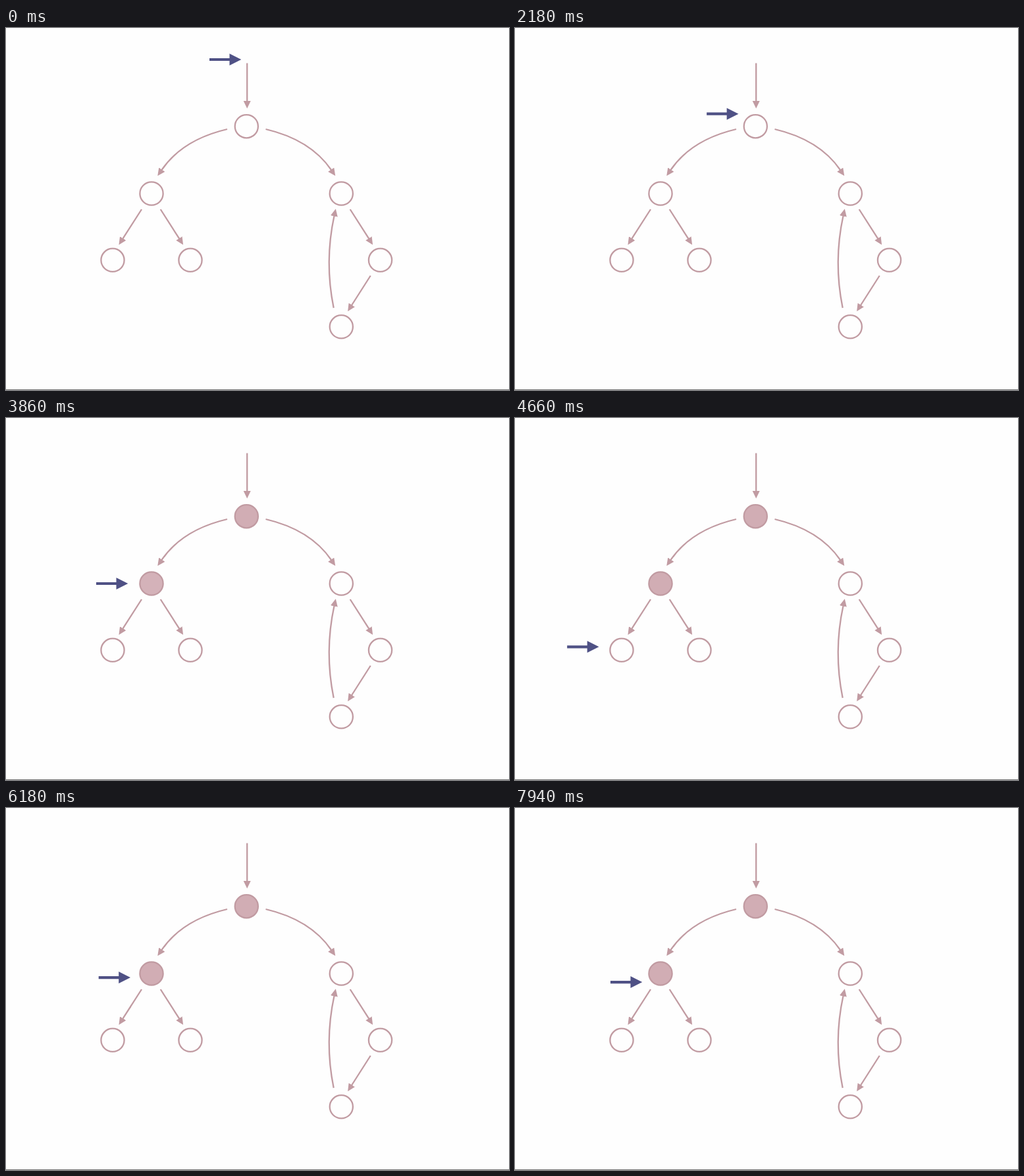
Animation of 764x551 px, one loop 8 s. Source, as an HTML page:

```html
<!DOCTYPE html>
<html lang="en">
<head>
<meta charset="utf-8">
<title>Tree traversal</title>
<style>
  html, body { margin: 0; width: 100%; height: 100%; overflow: hidden; background: #fefefe; }
  svg { display: block; width: 764px; height: 551px; }
  .edge { fill: none; stroke: #c19ba2; stroke-width: 2.3; marker-end: url(#head); }
  .node { fill: #d1adb4; fill-opacity: 0; stroke: #c19ba2; stroke-width: 2.3; }
</style>
</head>
<body>
<svg viewBox="0 0 764 551">
  <defs>
    <marker id="head" markerUnits="userSpaceOnUse" markerWidth="12" markerHeight="12"
            refX="0.5" refY="5.5" orient="auto">
      <path d="M0 0L11.5 5.5L0 11Z" fill="#c19ba2"/>
    </marker>
  </defs>
  <rect y="550" width="764" height="1" fill="#747474"/>
  <g class="edges">
    <path class="edge" d="M366.2 53.5V111.5"/>
    <path class="edge" d="M336 154Q268 170 236.5 216"/>
    <path class="edge" d="M394.5 154Q462.5 170 494 216"/>
    <path class="edge" d="M206 276L177.4 320.7"/>
    <path class="edge" d="M234.7 276L263.2 320.7"/>
    <path class="edge" d="M522.7 276L551.2 320.7"/>
    <path class="edge" d="M553.7 377L525 422"/>
    <path class="edge" d="M497.7 426Q483.4 356 498.5 286"/>
  </g>
  <circle class="node" id="root" cx="365.3" cy="149.7" r="17.6"/>
  <circle class="node" id="left" cx="221" cy="252" r="17.6"/>
  <circle class="node" cx="509.3" cy="252" r="17.6"/>
  <circle class="node" id="leafA" cx="162" cy="353.3" r="17.6"/>
  <circle class="node" id="leafB" cx="280" cy="353.3" r="17.6"/>
  <circle class="node" cx="568.5" cy="353.3" r="17.6"/>
  <circle class="node" cx="509.3" cy="454.8" r="17.6"/>
  <path id="pointer" d="M0 -2.1H30.5V-9L48.3 0L30.5 9V2.1H0Z" fill="#4f5185"/>
</svg>
<script>
  const LOOP = 8000, STEP = 80, OFFSET = 20;
  const MOVE = 884, FADE_IN = 340, FADE_OUT = 540;
  const $ = id => document.getElementById(id);
  const clamp = v => Math.min(1, Math.max(0, v));
  const ease = u => (1 - Math.cos(Math.PI * u)) / 2;

  const start = [309, 48], root = [290, 136], left = [137, 252];
  const leafA = [77, 352], leafB = [198, 352];

  // bend is the control point offset from the middle of the chord
  const moves = [
    { at: 1436, from: start, to: root },
    { at: 2660, from: root, to: left, bend: [-23, -30.3] },
    { at: 3884, from: left, to: leafA },
    { at: 5104, from: leafA, to: left },
    { at: 6040, from: left, to: leafB },
    { at: 7264, from: leafB, to: left }
  ];
  const fills = [
    { id: 'root', on: 2320 },
    { id: 'left', on: 3544 },
    { id: 'leafA', on: 4768, off: 5104 },
    { id: 'leafB', on: 6924, off: 7264 }
  ];

  function position(t) {
    const m = moves.filter(m => m.at <= t).pop() || moves[0];
    const k = ease(clamp((t - m.at) / MOVE));
    const bend = m.bend || [0, 0];
    return m.from.map((a, i) => a + (m.to[i] - a) * k + 2 * k * (1 - k) * bend[i]);
  }

  function draw(t) {
    const [x, y] = position(t);
    $('pointer').setAttribute('transform', `translate(${x.toFixed(2)} ${y.toFixed(2)})`);
    for (const f of fills) {
      const shown = clamp((t - f.on) / FADE_IN);
      const gone = f.off ? clamp((t - f.off) / FADE_OUT) : 0;
      $(f.id).style.fillOpacity = Math.min(shown, 1 - gone);
    }
  }

  function tick() {
    const t = performance.now() % LOOP;
    draw(Math.floor((t - OFFSET) / STEP) * STEP + OFFSET);
    requestAnimationFrame(tick);
  }
  tick();
</script>
</body>
</html>
```
